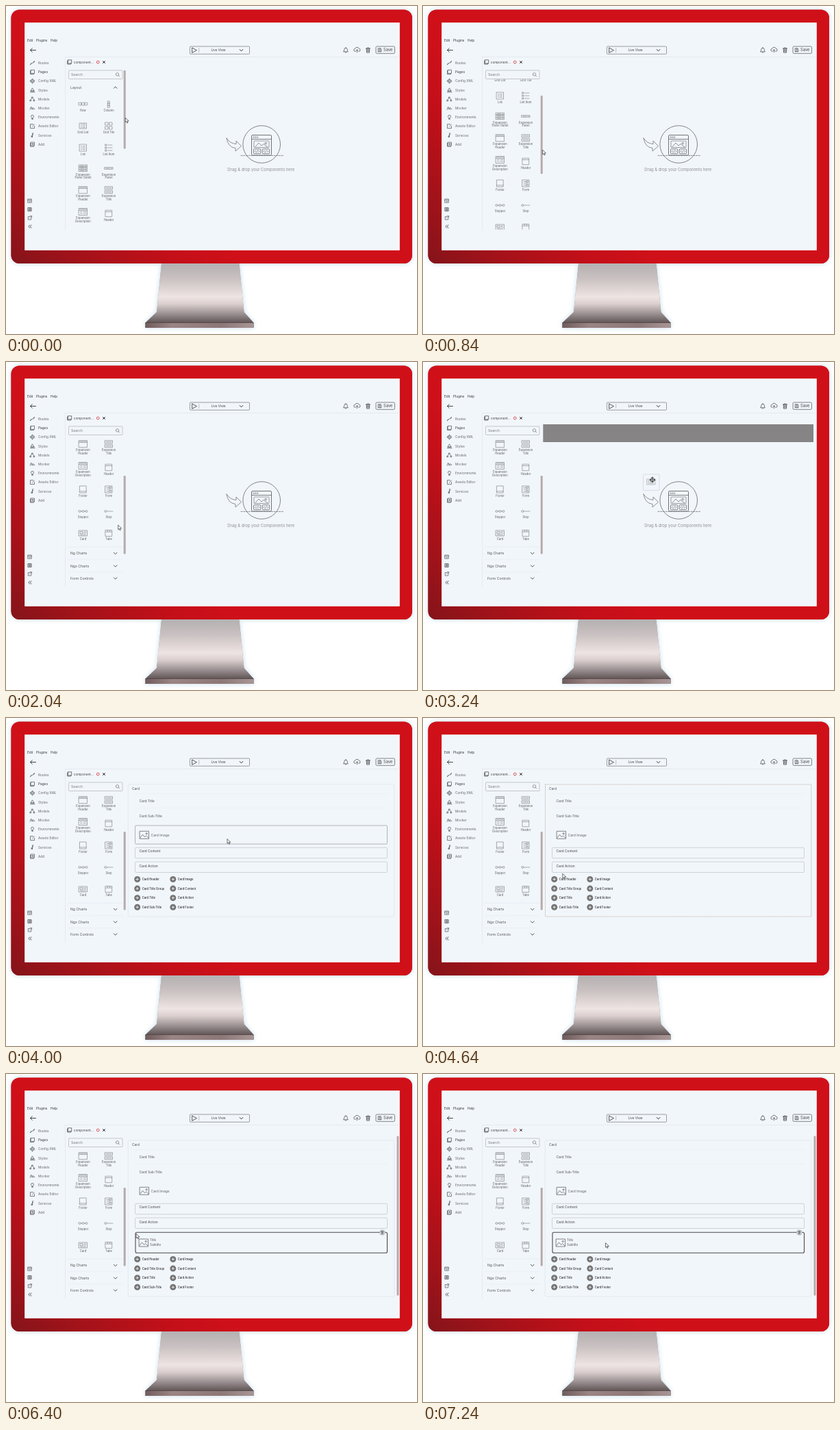
An HTML page with a canvas for the animation above (8 s loop, 600 by 479 pixels).

```html
<!DOCTYPE html>
<html lang="en">
<head>
<meta charset="utf-8">
<title>Component editor</title>
<style>
html, body { margin: 0; width: 100%; height: 100%; overflow: hidden; background: #fff; }
canvas { display: block; width: 100vw; height: 100vh; }
</style>
</head>
<body>
<canvas id="stage"></canvas>
<script>
const W = 600, H = 479, LOOP = 8000, STEP = 40;
const PAPER = '#f1f6fb', THUMB = '#b6aaa8', GREY = '#777';
const canvas = document.getElementById('stage');
const ctx = canvas.getContext('2d');

const lerp = (a, b, p) => a + (b - a) * p;
const clamp = p => Math.min(1, Math.max(0, p));
const span = (t, a, b) => clamp((t - a) / (b - a));
const easeOut = (p, power) => 1 - (1 - p) ** power;
const easeInOut = p => p * p * (3 - 2 * p);

// ---- drawing helpers ----
function text(s, x, y, size, color = '#555', align = 'left', weight = 400) {
  ctx.font = `${weight} ${size}px Inter, sans-serif`;
  ctx.textAlign = align;
  ctx.textBaseline = 'alphabetic';
  ctx.fillStyle = color;
  ctx.fillText(s, x, y + size * 0.36);
}
function rect(x, y, w, h, r, fill, stroke, width = 0.7) {
  ctx.beginPath();
  ctx.roundRect(x, y, w, h, r);
  if (fill) { ctx.fillStyle = fill; ctx.fill(); }
  if (stroke) { ctx.strokeStyle = stroke; ctx.lineWidth = width; ctx.stroke(); }
}
function icon(d, x, y, stroke = GREY, width = 0.7, fill) {
  const path = new Path2D(d);
  ctx.save();
  ctx.translate(x, y);
  ctx.lineJoin = ctx.lineCap = 'round';
  if (fill) { ctx.fillStyle = fill; ctx.fill(path); }
  ctx.strokeStyle = stroke;
  ctx.lineWidth = width;
  ctx.stroke(path);
  ctx.restore();
}
function disc(x, y, r, fill, stroke, width = 0.7) {
  rect(x - r, y - r, 2 * r, 2 * r, r, fill, stroke, width);
}
function gradient(x0, y0, x1, y1, stops) {
  const g = ctx.createLinearGradient(x0, y0, x1, y1);
  stops.forEach(([at, color]) => g.addColorStop(at, color));
  return g;
}
const ring = (x, r) => `M${x - r} 0a${r} ${r} 0 1 0 ${2 * r} 0a${r} ${r} 0 1 0 ${-2 * r} 0`;
const cell = (x, y, w, h) => `M${x} ${y}h${w}v${h}h${-w}z`;

const CHEVRON_DOWN = 'M-2.3-1.2L0 1.2L2.3-1.2';
const CHEVRON_UP = 'M-2.3 1.2L0-1.2L2.3 1.2';
const CARD = cell(-6, -4, 12, 8) + cell(-4, -2.2, 3.5, 2.8) + 'M1.2-2h3M1.2 0h3M-4 2.3h8';
const PICTURE = cell(-6.5, -5.5, 13, 11) + 'M-6 4L-2.5-0.5L0.5 3L2.5 1L6 4.5M2.2-2a1.1 1.1 0 1 0 2.2 0a1.1 1.1 0 1 0-2.2 0';
const PAGE = 'M-2-3h5v5h-5zM-2-1.8h-1v5h5v-1';
const TRASH = 'M-3-2.5h6M-1-2.5v-1h2v1M-2.3-2.5l0.3 6h4l0.3-6M-0.7-1v3M0.7-1v3';

// ---- content ----
const sidebar = [
  ['Routes', 'M-3 2.5q0-2.5 3-2.5t3-2.5M-3 2.5l1.5-1.5M3-2.5l-1.5 1'],
  ['Pages', PAGE],
  ['Config XML', ring(0, 2.6) + ring(0, 1) + 'M0-3.4v1M0 2.4v1M-3.4 0h1M2.4 0h1'],
  ['Styles', 'M-3 3h6.5M-2.5 1l2.5-4l2.5 4zM-2 1.2h4.5'],
  ['Models', 'M-0.7-3h1.4v1.4h-1.4zM-3.3 1.4h1.4v1.4h-1.4zM1.9 1.4h1.4v1.4h-1.4zM-1.3-1l-1 1.6M1.3-1l1 1.6'],
  ['Mocker', 'M-3.3 2l1.5-4l1.5 4l1.2-3l1 2M2 2l1.3-1.5'],
  ['Environments', 'M-1 1q-1-1-1-2a2 2 0 1 1 4 0q0 1-1 2zM-1 2.2h2M-0.5 3.2h1'],
  ['Assets Editor', 'M3 0v3h-6v-6h4M0 0.5l3-3.2'],
  ['Services', 'M1.5-3h-1.5v5M-1.4 1.8a0.8 0.8 0 1 0 1.4 0a0.8 0.8 0 1 0-1.4 0M0-1h1.4'],
  ['Add', PAGE + 'M0.5-1.8v2.6M-0.8-0.5h2.6']
];
const threeBars = [-5, -1.5, 2].map(y => cell(-6, y, 12, 2.6) + `M-4 ${y + 1.3}h5M3 ${y + 1.3}h1.5`).join('');
const listRows = [-2.3, 0, 2.3].map(y => `M-3 ${y}h1M-0.5 ${y}h3.5`).join('');
// [label, icon y, label y, icon, label, icon y, label y, icon]
const tiles = [
  ['Row', 143, 152.5, [-6.2, -1.8, 2.6].map(x => cell(x, -1.8, 3.6, 3.6)).join(''),
   'Column', 143.5, 152.5, [-4.6, -1.5, 1.6].map(y => cell(-1.3, y, 2.6, 3.1)).join('')],
  ['Grid List', 175, 184, cell(-5, -4, 10, 8) + listRows,
   'Grid Tile', 175, 184, [[-5, -5], [1, -5], [-5, 1], [1, 1]].map(([x, y]) => cell(x, y, 4, 4)).join('')],
  ['List', 207, 216, cell(-5, -5, 10, 10) + listRows,
   'List Item', 207, 216, [-4, 0, 4].map(y => cell(-5, y - 1, 2, 2) + `M-1.2 ${y}h6.2`).join('')],
  ['Expansion|Panel Outlet', 237, 246, threeBars,
   'Expansion|Panel', 237, 246, cell(-6, -1.3, 12, 2.6) + 'M-4 0h5M3 0h1.5'],
  ['Expansion|Header', 268.7, 277.7, cell(-6, -5, 12, 10) + 'M-6-2.3h12M-5-3.7h10',
   'Expansion|Title', 268.7, 277.7, cell(-5.5, -5, 11, 4) + cell(-5.5, 1, 11, 4) + 'M-4-3h8M-4 3h8'],
  ['Expansion|Description', 300.5, 309.5, cell(-6, -5, 12, 10) + 'M-6-2h12M-5-3.6h10M-4 0h2.5M0.5 0h4M-4 2.5h2.5M0.5 2.5h4',
   'Header', 303, 312, cell(-4.7, -4.7, 9.4, 9.4) + 'M-4.7-2.5h9.4'],
  ['Footer', 335, 344, cell(-4.7, -5, 9.4, 10) + 'M-4.7 2.8h9.4',
   'Form', 335, 344, cell(-5, -5, 10, 10) + 'M-3-2.6h3M-3-0.2h6M-3 2.6h2.5' + cell(1, -3.5, 2.4, 1.8) + cell(1, 1.5, 2.4, 1.8)],
  ['Stepper', 367, 375.7, ring(-5, 1.5) + ring(0, 1.5) + ring(5, 1.5) + 'M-3.5 0h2M1.5 0h2',
   'Step', 367, 375.7, ring(-4.6, 1.5) + 'M-3 0h9'],
  ['Card', 399, 407.7, CARD,
   'Tabs', 399, 407.7, cell(-4.7, -4.5, 9.4, 9) + 'M-4.7-2h9.4M-1.6-4.5v2.5M1.6-4.5v2.5']
];
const groups = [['Ng Charts', 428.5], ['Ngx Charts', 447], ['Form Controls', 465]];
const adders = ['Card Header', 'Card Title Group', 'Card Title', 'Card Sub-Title',
                'Card Image', 'Card Content', 'Card Action', 'Card Footer'];

// ---- scene parts ----
function monitor() {
  ctx.fillStyle = '#fff';
  ctx.fillRect(0, 0, W, H);
  ctx.save();
  ctx.shadowColor = 'rgba(175,208,226,.75)';
  ctx.shadowBlur = 7 * canvas.width / W;
  rect(7.5, 5.5, 585.5, 370.5, 12, '#c9111a');
  const neck = new Path2D('M227 376.5H340.5L347.5 447L361.5 462.5V470H203.5V462.5L220 447Z');
  ctx.fillStyle = '#a89a9a';
  ctx.fill(neck);
  ctx.restore();
  rect(7.5, 5.5, 585.5, 370.5, 12, gradient(15, 376, 185, 206,
    [[0, '#86141a'], [0.3, '#a31219'], [0.7, '#c40f19'], [1, '#d01019']]));
  ctx.fillStyle = gradient(0, 376, 0, 463,
    [[0, '#b4b0b1'], [0.25, '#c9c0c1'], [0.56, '#eee4e2'], [0.68, '#dacfce'], [0.84, '#9d9293'], [1, '#5f5354']]);
  ctx.fill(neck);
  rect(203.5, 462.5, 158, 7.5, 0.5, gradient(203, 0, 362, 0,
    [[0, '#6f5c5c'], [0.25, '#9b8484'], [0.7, '#8d7777'], [1, '#a99696']]));
  icon('M204 462.5h157', 0, 0, '#4f4546', 0.8);
  rect(27.5, 24.5, 547, 332, 0, PAPER, 'rgba(255,255,255,.75)', 0.8);
}

function toolbar() {
  [['Edit', 31], ['Plugins', 44], ['Help', 65]].forEach(([s, x]) => text(s, x, 50.5, 4.7, '#333'));
  icon('M4 0h-8M-1.3-2.8L-4 0L-1.3 2.8', 39.5, 64.5, '#333', 0.9);
  rect(268.5, 59, 87, 11.2, 1, null, '#777');
  icon('M-3-3.5L3.5 0L-3 3.5z', 275, 64.6, '#333', 0.8);
  icon('M0-3v6', 281.7, 64.6, '#999', 0.6);
  text('Live View', 310, 64.7, 4.7, '#444', 'center');
  icon(CHEVRON_DOWN, 343.5, 64.7, '#333', 1);
  icon('M-3.2 2q1-1 1-3a2.2 2.2 0 0 1 4.4 0q0 2 1 3zM-0.8 3.3h1.6M0-3.2v-0.8', 496, 64.5, '#555', 0.8);
  icon('M-2 2h-0.5a2 2 0 0 1-0.3-4a3 3 0 0 1 5.6 0a2 2 0 0 1-0.3 4h-0.5M0 3.5v-4M-1.2 0.7L0-0.5L1.2 0.7', 512.5, 64.2, '#555', 0.8);
  icon(TRASH, 528.5, 64.5, '#444', 0.8);
  rect(540, 59, 27.5, 10.3, 1.5, null, '#555');
  icon('M-2.2-2.4h3.6l0.9 0.9v3.9h-4.5zM-1-2.4v1.5h2v-1.5M-1.2 2.4v-1.8h2.4v1.8', 545.7, 64.3, '#444', 0.6);
  text('Save', 551, 64.4, 5.8, '#444');
}

function sideMenu() {
  sidebar.forEach(([s, d], i) => {
    const y = 83.2 + i * 13.2;
    icon(d, 38.5, y, '#555', 0.75);
    text(s, 47, y, 4.75, s === 'Pages' ? '#333' : '#666');
  });
  icon(cell(-2.6, -2.6, 5.2, 5.2) + 'M-2.6-1h5.2M-1 1h2.2', 34.7, 284.5, '#555');
  icon(cell(-2.4, -2.4, 4.8, 4.8) + 'M-1.2-1h2.4M-1.2 0h2.4M-1.2 1h2.4', 34.7, 297, '#444', 0.8);
  icon('M0-2h-2.4v4.5h4.5v-2.3M0.5-2.8h2.3v2.3M2.8-2.8L0 0', 34.7, 309.5, '#555');
  icon('M-0.2-2.2L-2.2 0L-0.2 2.2M2.2-2.2L0.2 0L2.2 2.2', 35, 322, '#444', 0.8);
}

function palette(scroll) {
  icon('M86.5 74.5V327M86.5 74.5H574', 0, 0, '#e2e8ee', 0.8);
  icon(PAGE, 92.7, 81.8, '#444', 0.75);
  text('component...', 98.7, 82, 4.7, '#444');
  disc(134.3, 82, 1.9, null, '#d8434b', 0.9);
  icon('M-1.5-1.5l3 3M1.5-1.5l-3 3', 143, 82, '#222', 0.95);
  rect(91.5, 94, 78.5, 12.5, 1, null, '#b4b4b6');
  text('Search', 95, 100.3, 5.1, '#777');
  icon(ring(-0.5, 2.2) + 'M1.2 1.5l1.7 1.7', 163, 99.8, GREY, 0.7);

  ctx.save();
  ctx.beginPath();
  ctx.rect(88, 107.3, 83, 219);
  ctx.clip();
  ctx.translate(0, -scroll);
  text('Layout', 94, 119.3, 5.1, '#555');
  icon(CHEVRON_UP, 159.7, 119, '#444', 0.9);
  const tile = (x, label, iconY, labelY, d) => {
    icon(d, x, iconY, '#808080', 0.65);
    label.split('|').forEach((s, i) => text(s, x, labelY + i * 4.7, 4.2, '#5c5c5c', 'center'));
  };
  tiles.forEach(row => {
    tile(112.5, ...row.slice(0, 4));
    tile(150, ...row.slice(4));
  });
  groups.forEach(([s, y]) => {
    icon('M91 0h79', 0, y - 9.2, '#e0e6ec', 0.6);
    text(s, 94, y, 5.1, '#555');
    icon(CHEVRON_DOWN, 159.7, y, '#444', 0.9);
  });
  ctx.restore();
  rect(171.7, 94 + scroll * 72 / 149, 3, 114.5, 1.2, THUMB);
}

function dropHint() {
  disc(373.2, 202, 27.3, null, '#777', 0.9);
  rect(358.5, 188.5, 29, 29.5, 1.5, PAPER, '#666', 0.9);
  icon('M358.5 194.5h29', 0, 0, '#666', 0.8);
  [361.5, 364.3, 367.1].forEach(x => disc(x, 191.6, 0.9, null, '#666', 0.6));
  rect(362, 197, 22, 9.5, 0.5, null, GREY);
  icon('M364 205.5l5-5.5l4 4l3-2.5l6 4.5' + 'M378 200.5a1.3 1.3 0 1 0 2.6 0a1.3 1.3 0 1 0-2.6 0', 0, 0, '#666');
  [361.5, 374.3].forEach(x => {
    rect(x, 208.7, 10.3, 7, 1, null, '#666', 0.8);
    icon('M-2-1.3L-3.4 0L-2 1.3M2-1.3L3.4 0L2 1.3M0.7-1.7L-0.7 1.7', x + 5.1, 212.2, '#666', 0.65);
  });
  ctx.setLineDash([2.2, 1.5]);
  icon('M343 218.4h62', 0, 0, GREY, 0.8);
  ctx.setLineDash([]);
  icon('M322 193q5 8 14 8.500v-4.500l7.500 7.500l-8.500 7.500v-4.500q-11-1-13-14.500z', 0, 0, GREY, 0.8);
  text('Drag & drop your Components here', 372.3, 239.2, 5.85, '#8f8f92', 'center');
}

function cardForm(cursor, added) {
  const extra = added ? 35 : 0;
  const over = (y, h) => cursor.x > 188 && cursor.x < 557 && cursor.y >= y && cursor.y <= y + h;
  const rows = [[157, 27], [189.3, 15.5], [210, 15.5]];
  const inRow = rows.some(r => over(...r)) || (added && over(231.3, 30));

  if (inRow) rect(178.3, 97, 388.7, 193 + extra, 1.5, null, '#e0e4e9', 0.7);
  else {
    ctx.setLineDash([1.2, 1]);
    rect(178.5, 97, 388.3, 193, 0, null, '#b3a592', 0.8);
    ctx.setLineDash([]);
  }
  text('Card', 184, 103.3, 4.9, '#555');
  icon('M188.5 131.500H557M188.5 110.500H557', 0, 0, '#e9eef3', 0.6);
  text('Card Title', 194.5, 121.7, 4.9, '#555');
  text('Card Sub-Title', 194.5, 143.7, 4.9, '#555');
  rows.forEach(([y, h], i) => {
    if (over(y, h)) rect(188.5, y, 368, h, 1.5, null, '#a3a3a5', 0.8);
    else if (i) rect(188.5, y, 368, h, 1.5, null, '#c6cacf', 0.8);
  });
  icon(PICTURE, 202, 170.8, '#666', 0.8);
  text('Card Image', 211.5, 170.7, 5, '#666');
  text('Card Content', 194.5, 194.7, 4.9, '#444');
  text('Card Action', 194.5, 215.8, 4.9, '#444');

  if (added) {
    rect(189, 231.3, 367.5, 30, 2, null, '#4a4a4c', 1.1);
    disc(549.3, 231.5, 3.8, '#dfe2e5', '#999', 0.6);
    ctx.save();
    ctx.translate(549.3, 231.5);
    ctx.scale(0.6, 0.6);
    icon(TRASH, 0, 0, '#444', 0.9);
    ctx.restore();
    icon(PICTURE, 201, 246.5, '#666', 0.8);
    text('Title', 210, 242.3, 4.5, '#555');
    text('Subtitle', 210, 249.5, 4.5, '#555');
    rect(570.5, 90.5, 3, 233, 1.2, THUMB);
  }
  adders.forEach((s, i) => {
    const x = i < 4 ? 191.7 : 243.8, y = 235.5 + extra + (i % 4) * 13.6;
    disc(x, y, 4.5, '#747474');
    icon('M-1.7 0h3.4M0-1.7v3.4', x, y, '#fff', 0.8);
    text(s, x + 7, y, 4.15, '#2c2c2c', 'left', 500);
  });
}

function dragGhost({ x, y }) {
  if (x > 178) rect(175.3, 91, 394.7, 26, 0, '#868484');
  rect(x - 13.5, y - 8, 23.5, 23.5, 1, 'rgba(241,246,251,.85)', '#d0d3d8', 0.7);
  icon(CARD, x - 2, y + 3, '#a8a8aa', 0.7);
  icon('M0-4l1.500 1.700h-3zM0 4l1.500-1.700h-3zM-4 0l1.700-1.500v3zM4 0l-1.700-1.500v3zM-2.500 0h5M0-2.500v5', x, y, '#444', 0.8, '#444');
}

function arrow({ x, y }) {
  icon('M0 0v6.200l1.500-1.300l1.100 2.500l1.100-0.500l-1.100-2.400h1.900z', x, y, '#333', 0.7, '#fff');
}

// ---- motion ----
// [start, end, from, to, ease]
const moves = [
  [600, 1400, [174.3, 163.5], [174.7, 235], p => easeOut(p, 3)],
  [2000, 2040, [174.7, 235], [163.7, 238.5], p => p],
  [2040, 2240, [163.7, 238.5], [112, 250], p => easeOut(p, 2)],
  [2480, 3240, [112, 250], [335, 172], easeInOut],
  [3520, 3560, [335, 172], [323, 177], p => p],
  [4000, 4800, [323, 177], [190, 233.5], easeInOut],
  [6960, 7240, [190, 233.5], [266.5, 247], easeInOut]
];
function cursorAt(t) {
  const [a, b, from, to, ease] = moves.filter(m => t >= m[0]).pop() || moves[0];
  const p = ease(span(t, a, b));
  return { x: lerp(from[0], to[0], p), y: lerp(from[1], to[1], p) };
}

function draw(t) {
  const cursor = cursorAt(t);
  const scroll = 149 * easeOut(span(t, 600, 1400), 2);
  const dragging = t >= 2480 && t < 3560;
  monitor();
  toolbar();
  sideMenu();
  palette(scroll);
  if (t < 3560) dropHint();
  else cardForm(cursor, t >= 6400);
  if (dragging) dragGhost(cursor);
  else arrow(cursor);
}

function resize() {
  const ratio = window.devicePixelRatio || 1;
  canvas.width = Math.round(innerWidth * ratio);
  canvas.height = Math.round(innerHeight * ratio);
}
addEventListener('resize', resize);
resize();

const start = performance.now();
function tick() {
  const t = Math.max(0, performance.now() - start) % LOOP;
  ctx.setTransform(canvas.width / W, 0, 0, canvas.height / H, 0, 0);
  draw(Math.floor(t / STEP) * STEP);
  requestAnimationFrame(tick);
}
tick();
</script>
</body>
</html>
```
